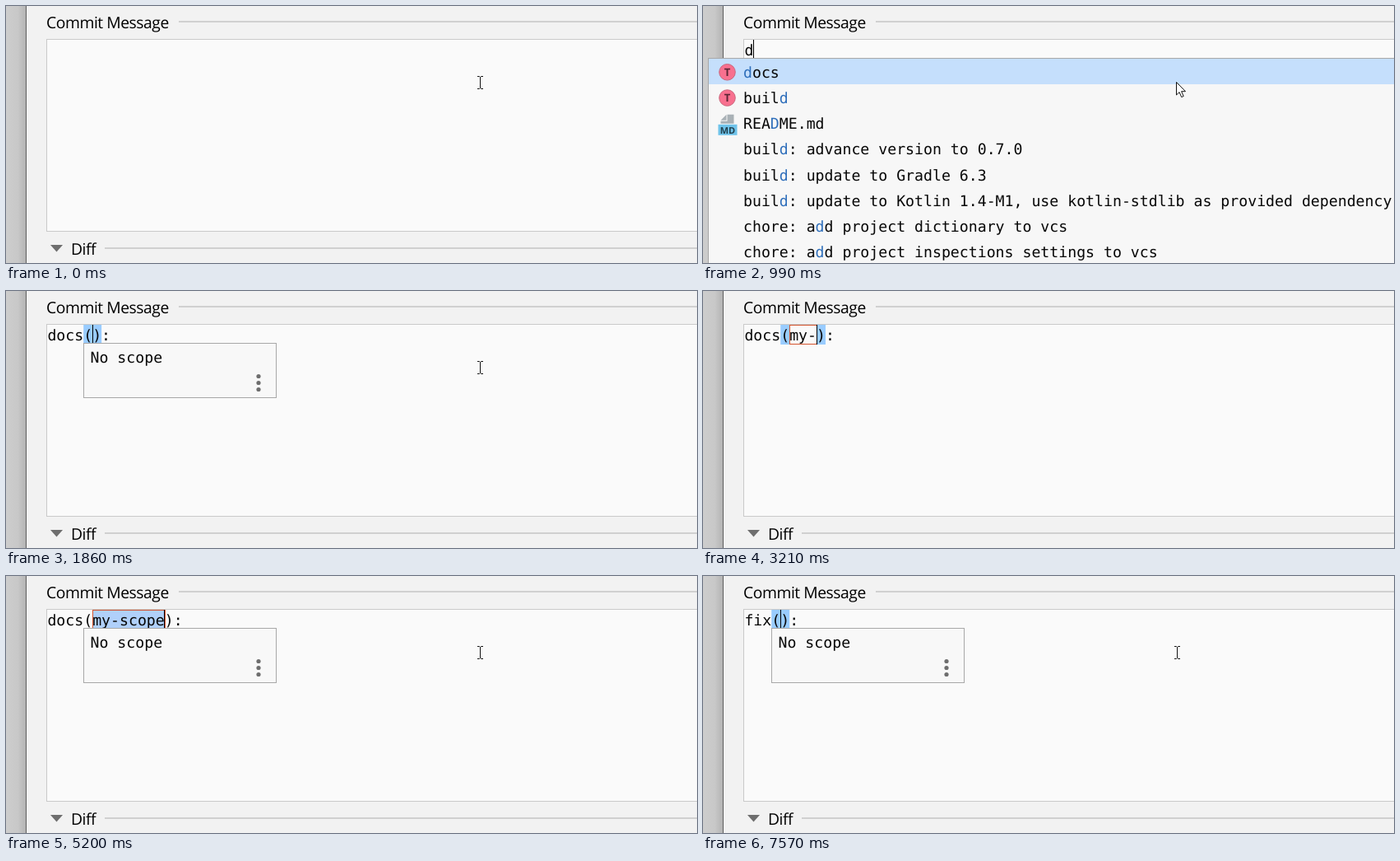
An HTML page for the animation above (8000 ms loop, 840 by 312 pixels).

```html
<!DOCTYPE html>
<html lang="en">
<head>
<meta charset="utf-8">
<title>Commit message completion</title>
<style>
html, body { margin: 0; width: 100%; height: 100%; overflow: hidden; background: #f2f2f2; }
svg { display: block; width: 840px; height: 312px; }
text { white-space: pre; text-rendering: geometricPrecision; }
.mono { font: 18.2px "DejaVu Sans Mono", monospace; fill: #080808; }
.label { font: 19.3px "Open Sans", "Noto Sans", sans-serif; letter-spacing: -.45px; fill: #000; }
.hit { fill: #2f6fbb; }
.icon { font: bold 13px "Open Sans", sans-serif; fill: #5c2635; text-anchor: middle; }
.md { font: bold 11px "Open Sans", sans-serif; fill: #23414f; text-anchor: middle; }
</style>
</head>
<body>
<svg viewBox="0 0 840 312">
  <defs>
    <linearGradient id="shade">
      <stop offset="0" stop-color="#cdcdcd"/>
      <stop offset=".6" stop-color="#c8c8c8"/>
      <stop offset="1" stop-color="#b4b4b4"/>
    </linearGradient>
  </defs>
  <rect width="840" height="312" fill="#f2f2f2"/>
  <rect width="24" height="312" fill="url(#shade)"/>
  <rect x="24" width="1" height="312" fill="#5e5e5e"/>
  <text class="label" x="49" y="27">Commit Message</text>
  <rect x="210" y="18" width="630" height="2" fill="#d0d0d0"/>
  <rect x="49" y="40" width="800" height="234" fill="#cacaca"/>
  <rect x="50" y="41" width="800" height="232" fill="#fafafa"/>
  <path d="M54 290h15l-7.5 8.5z" fill="#6e6e6e"/>
  <text class="label" x="79" y="302">Diff</text>
  <rect x="120" y="293" width="720" height="2" fill="#d0d0d0"/>
  <g id="live"></g>
</svg>
<script>
const LOOP = 8000, CHAR = 10.957, LEFT = 50.4, ROW = 31.25, TOP = 63;
const live = document.getElementById('live');
const col = n => LEFT + n * CHAR;

const rect = (x, y, w, h, fill, extra = '') =>
  `<rect x="${x}" y="${y}" width="${w}" height="${h}" fill="${fill}" ${extra}/>`;
const mono = (x, y, s, extra = '') => `<text class="mono" x="${x}" y="${y}" ${extra}>${s}</text>`;
// [x] marks matched letters
const mark = s => s.replace(/\[(.+?)\]/g, '<tspan class="hit">$1</tspan>');

const icons = {
  T: (x, y) => `<circle cx="${x}" cy="${y}" r="9.8" fill="#f8708f" stroke="#c9677c"/>` +
    `<text class="icon" x="${x}" y="${y + 4.7}">T</text>`,
  MD: (x, y) => `<path d="M${x - 8} ${y - 4}l7-7v7zM${x} ${y - 11}h8v11h-16v-3h8z" fill="#a9b1b6"/>` +
    rect(x - 11, y + 1, 23, 13, '#6fc3ea') +
    `<text class="md" x="${x + .5}" y="${y + 11.7}">MD</text>`
};

const types = ['fix', 'test', 'docs', 'build', 'ci', 'chore', 'style', 'revert'].map(s => 'T|' + s);
const matchD = ['T|[d]ocs', 'T|buil[d]', 'MD|REA[D]ME.md',
  '|buil[d]: advance version to 0.7.0', '|buil[d]: update to Gradle 6.3',
  '|buil[d]: update to Kotlin 1.4-M1, use kotlin-stdlib as provided dependency',
  '|chore: a[d]d project dictionary to vcs', '|chore: a[d]d project inspections settings to vcs'];
const matchDo = ['T|[do]cs', '|refactor: avoid index [do]cuments twice'];
const subjects = ['advance version to 0.7.0', 'update to Gradle 6.3',
  'update to Kotlin 1.4-M1, use kotlin-stdlib as provided dependency',
  'add project dictionary to vcs', 'add project inspections settings to vcs',
  'avoid index documents twice', 'update readme', 'update change notes'].map(s => '|' + s);

function list({ items, x = 6, w = 842, active, more }) {
  const h = more ? items.length * ROW + 35.5 : 260;
  let out = rect(x + .5, TOP + .5, w - 1, h, '#f7f7f7', 'stroke="#a8a8a8"');
  if (active) out += rect(x + 1, TOP + 1, w - 2, 31, '#c5dffc');
  items.forEach((item, i) => {
    const [icon, s] = item.split('|');
    const y = 80 + i * ROW;
    if (icon) out += icons[icon](x + 23.5, y + .3);
    out += mono(x + 43, y + 6.7, mark(s));
  });
  return out + (more ? dots(x + w - 22) : '').replace(/Y/g, TOP + h - 18.5);
}

const dots = x => [-8, 0, 8].map(d =>
  `<circle cx="${x}" cy="Y" r="2.6" fill="#6e6e6e" transform="translate(0 ${d})"/>`).join('');

const noScope = n => {
  const x = Math.round(col(n) - 11);
  return rect(x + .5, TOP + .5, 234, 66, '#f8f8f8', 'stroke="#a8a8a8"') +
    mono(x + 8.5, 86.7, 'No scope', 'font-style="italic"') +
    dots(x + 213).replace(/Y/g, 111.5);
};

const mice = {
  beam: '<path d="M573 85.5h2.5l1 1 1-1h2.5M576.5 86v14M573 100.5h2.5l1-1 1 1h2.5" fill="none" stroke="#111"/>',
  arrow: '<path d="M575.5 92.5v15.5l3.6-3.4 2.6 6 2.5-1.1-2.6-5.8h4.9z" fill="#fff" stroke="#111"/>'
};

const scopeList = noScope(5);
const openTypes = list({ items: types });
const smallTypes = active => list({ items: types, w: 246, active });
const full = 'docs(my-scope):';

// Typed scope between highlighted parentheses
const scope = (at, s, popup = '', mouse = '') =>
  ({ at, text: `docs(${s}):`, caret: 5 + s.length, box: [5, 5 + s.length], braces: true, popup, mouse });

const steps = [
  { at: 0, mouse: 'beam' },
  { at: 190, caret: 0, mouse: 'beam' },
  { at: 370, caret: 0, popup: openTypes, mouse: 'beam' },
  { at: 440, caret: 0, popup: openTypes, mouse: 'arrow' },
  { at: 670, popup: openTypes, mouse: 'arrow' },
  { at: 990, text: 'd', caret: 1, popup: list({ items: matchD, active: true }), mouse: 'arrow' },
  { at: 1120, text: 'do', caret: 2, popup: list({ items: matchDo, active: true, more: true }), mouse: 'arrow' },
  { at: 1680, text: 'do', popup: list({ items: matchDo, active: true, more: true }), mouse: 'arrow' },
  scope(1860, '', scopeList, 'beam'),
  scope(2600, 'm', scopeList),
  scope(2850, 'my', scopeList),
  scope(3210, 'my-'),
  scope(3340, 'my-s'),
  scope(3520, 'my-sc'),
  scope(3640, 'my-sco'),
  scope(3840, 'my-scop'),
  scope(3910, 'my-scope'),
  { at: 4270, text: full, caret: 16, popup: list({ items: subjects, x: 181 }), mouse: 'arrow' },
  { at: 5130, text: full, caret: 13, box: [5, 13], sel: true, mouse: 'beam' },
  { at: 5200, text: full, caret: 13, box: [5, 13], sel: true, popup: scopeList, mouse: 'beam' },
  { at: 5700, text: full, caret: 4, box: [0, 4], sel: true, mouse: 'beam' },
  { at: 5770, text: full, caret: 4, box: [0, 4], sel: true, popup: smallTypes(false), mouse: 'beam' },
  { at: 6450, text: full, caret: 4, box: [0, 4], sel: true, popup: smallTypes(true), mouse: 'beam' },
  { at: 6650, text: full, box: [0, 4], sel: true, popup: smallTypes(true), mouse: 'beam' },
  { at: 6830, text: 'fix(my-scope):', caret: 3, box: [0, 3], mouse: 'beam' },
  { at: 7570, text: 'fix():', caret: 4, braces: true, popup: noScope(4), mouse: 'beam' }
];

function draw({ text = '', caret, box, sel, braces, popup = '', mouse }) {
  let out = '';
  if (braces) {
    for (const c of '()') out += rect(col(text.indexOf(c)), 41, CHAR, 24, '#99ccff');
  }
  if (box) {
    const x = Math.round(col(box[0])), w = Math.round(col(box[1])) - x;
    if (sel) out += rect(x, 41, w, 24, '#b0d0fa');
    out += rect(x + .5, 41.5, w, 23, 'none', 'stroke="#d4552f"');
  }
  out += mono(LEFT, 60, text);
  if (caret !== undefined) out += rect(Math.floor(col(caret)), 41, 1, 24, '#000');
  live.innerHTML = out + popup + (mice[mouse] || '');
}

let shown;
function tick(now) {
  const t = now % LOOP;
  const step = steps.findLast(s => s.at <= t);
  if (step !== shown) draw(shown = step);
  requestAnimationFrame(tick);
}
const start = performance.now();
const run = () => tick(Math.max(0, performance.now() - start));
tick = (inner => () => inner(Math.max(0, performance.now() - start)))(tick);
run();
</script>
</body>
</html>
```
